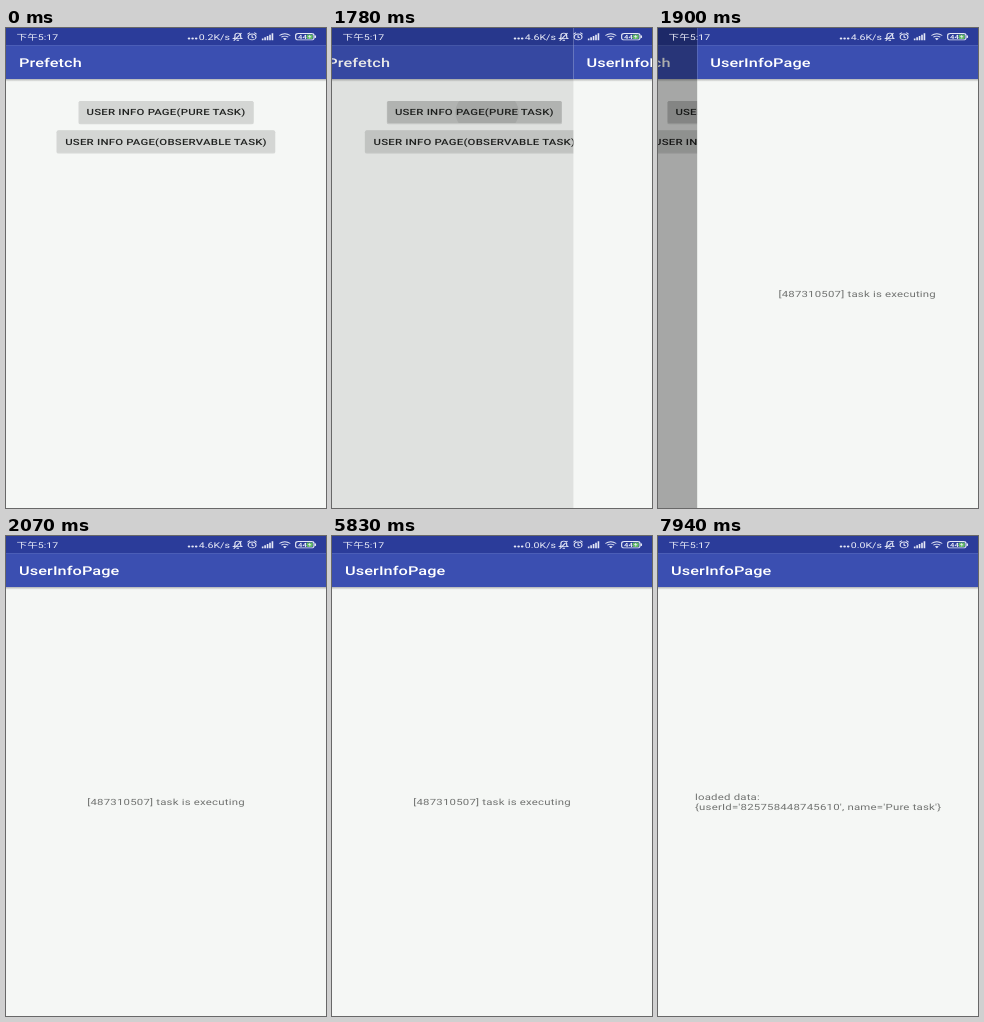
Write an HTML page that moves like this. It is 320 by 480 pixels and loops after 7.99 s.

```html
<!DOCTYPE html>
<html lang="zh">
<head>
<meta charset="utf-8">
<title>Prefetch</title>
<style>
  html, body { margin: 0; width: 100%; height: 100%; overflow: hidden; background: #f5f7f5; }
  svg { display: block; width: 100%; height: 100%; }
  text {
    font: 14px Roboto, "Noto Sans CJK SC", "Noto Sans CJK JP", "Noto Sans CJK", sans-serif;
    letter-spacing: .25px;
    text-rendering: geometricPrecision;
    white-space: pre;
  }
  .title { font-size: 20px; font-weight: 500; letter-spacing: .1px; fill: #fff; }
  .label { font-weight: 500; fill: #202220; text-anchor: middle; }
  .body { fill: #707270; }
  .status text { font-size: 13px; letter-spacing: 0; fill: #eef0fa; }
  .line { fill: none; stroke: #e6e9f7; stroke-width: 1.4; }
  .solid { fill: #e6e9f7; }
</style>
</head>
<body>
<!-- A 1080x2160 screen at 440 dpi, in dp, squeezed into the stage -->
<svg viewBox="0 0 392.73 785.45" preserveAspectRatio="none">
  <defs>
    <linearGradient id="shade" x2="0" y2="1">
      <stop stop-color="#000" stop-opacity=".26"/>
      <stop offset="1" stop-color="#000" stop-opacity="0"/>
    </linearGradient>
    <clipPath id="buttonClip"><rect x="89.5" y="119.5" width="214" height="36" rx="2"/></clipPath>
    <g id="frame">
      <rect width="393" height="786" fill="#f5f7f5"/>
      <rect width="393" height="28" fill="#2b3c9a"/>
      <rect y="28" width="393" height="55.5" fill="#3b4fb1"/>
      <rect y="83.5" width="393" height="4.5" fill="url(#shade)"/>
    </g>
  </defs>

  <g id="home">
    <use href="#frame"/>
    <text class="title" x="16" y="63">Prefetch</text>
    <g fill="#000" opacity=".12">
      <rect x="89" y="120" width="215" height="37.5" rx="2.5"/>
      <rect x="62" y="168" width="268.5" height="37.5" rx="2.5"/>
    </g>
    <g fill="#d4d6d4">
      <rect x="89.5" y="119.5" width="214" height="36" rx="2"/>
      <rect x="62.5" y="167.5" width="267.5" height="36" rx="2"/>
    </g>
    <g id="press" clip-path="url(#buttonClip)">
      <rect x="89" y="119" width="215" height="37" opacity=".08"/>
      <circle id="ripple" cx="212" cy="138" opacity=".07"/>
    </g>
    <text class="label" x="196.4" y="143">USER INFO PAGE(PURE TASK)</text>
    <text class="label" x="196.4" y="191">USER INFO PAGE(OBSERVABLE TASK)</text>
  </g>
  <rect id="dim" width="393" height="786"/>

  <g id="detail">
    <use href="#frame"/>
    <text class="title" x="16" y="63">UserInfoPage</text>
    <text id="running" class="body" x="196.4" y="440" text-anchor="middle">[487310507] task is executing</text>
    <g id="loaded">
      <text class="body" x="45.4" y="432">loaded data:</text>
      <text class="body" x="45.4" y="448.4">{userId='825758448745610', name='Pure task'}</text>
    </g>
  </g>

  <g class="status">
    <text x="13" y="20">下午5:17</text>
    <g class="solid">
      <circle cx="224.6" cy="17.2" r="1.6"/><circle cx="229" cy="17.2" r="1.6"/><circle cx="233.4" cy="17.2" r="1.6"/>
    </g>
    <text id="speed" x="236.5" y="20"></text>
    <!-- muted bell -->
    <path class="line" d="M279 17.5h10.5l-1.5-2v-3.5q0-3.5-3.5-3.5t-3.5 3.5v3.5zM283 20h3M279.5 21l9.5-13"/>
    <!-- alarm clock -->
    <g class="line">
      <circle cx="302" cy="14.7" r="4.8"/>
      <path d="M302 11.8v3.2l2 1.2M296.3 10.2l3-2.6M307.7 10.2l-3-2.6"/>
    </g>
    <!-- signal -->
    <path class="solid" d="M314 17h2v3h-2zM317 15h2v5h-2zM320 13h2v7h-2zM323 11h2v9h-2zM326 8.5h2v11.500h-2z"/>
    <!-- wifi -->
    <path class="line" d="M335.500 12.200q6.700-5.600 13.400 0M338 15q4.200-3.400 8.400 0"/>
    <path class="solid" d="M339.800 17q2.400-1.600 4.800 0l-2.400 3z"/>
    <path id="traffic" class="solid" d="M346 17.500h4l-2 3z"/>
    <!-- charging battery -->
    <rect class="line" x="355.500" y="9" width="22.500" height="10.500" rx="3.200"/>
    <rect x="369" y="10.500" width="7.500" height="7.500" rx="1.500" fill="#62bd62"/>
    <rect class="solid" x="378.700" y="12.200" width="1.800" height="4"/>
    <text x="358.500" y="17.800" style="font-size:9.500px;font-weight:500">44</text>
    <path class="solid" d="M373.500 10.500l-3 4.200h2l-.8 3.300 3.200-4.300h-2z"/>
  </g>
</svg>
<script>
  const LOOP = 7990, WIDTH = 392.73;
  const PRESS = 1370, SLIDE = 1754, SLIDE_TIME = 290, STOPPED = 5790, LOADED = 6660;
  const el = id => document.getElementById(id);
  const clamp = v => Math.max(0, Math.min(1, v));
  const show = (id, on) => el(id).setAttribute('visibility', on ? 'visible' : 'hidden');
  const moveX = (id, x) => el(id).setAttribute('transform', `translate(${x} 0)`);

  function draw(t) {
    const tick = Math.floor((t - 20) / 40) * 40 + 20;
    const slide = 1 - (1 - clamp((tick - SLIDE) / SLIDE_TIME)) ** 3;

    moveX('home', -.225 * WIDTH * slide);
    moveX('detail', WIDTH * (1 - slide));
    el('dim').setAttribute('opacity', .37 * slide);

    el('press').setAttribute('opacity', clamp((tick - PRESS) / 120));
    el('ripple').setAttribute('r', 39 * clamp((tick - PRESS) / 370));

    el('speed').textContent = tick < SLIDE ? '0.2K/s' : t < STOPPED ? '4.6K/s' : '0.0K/s';
    show('traffic', (t >= PRESS && t < 1780) || (t >= 3970 && t < 4970));
    show('running', t < LOADED);
    show('loaded', t >= LOADED);
  }

  const start = performance.now();
  function frame() {
    draw((performance.now() - start) % LOOP);
    requestAnimationFrame(frame);
  }
  frame();
</script>
</body>
</html>
```
